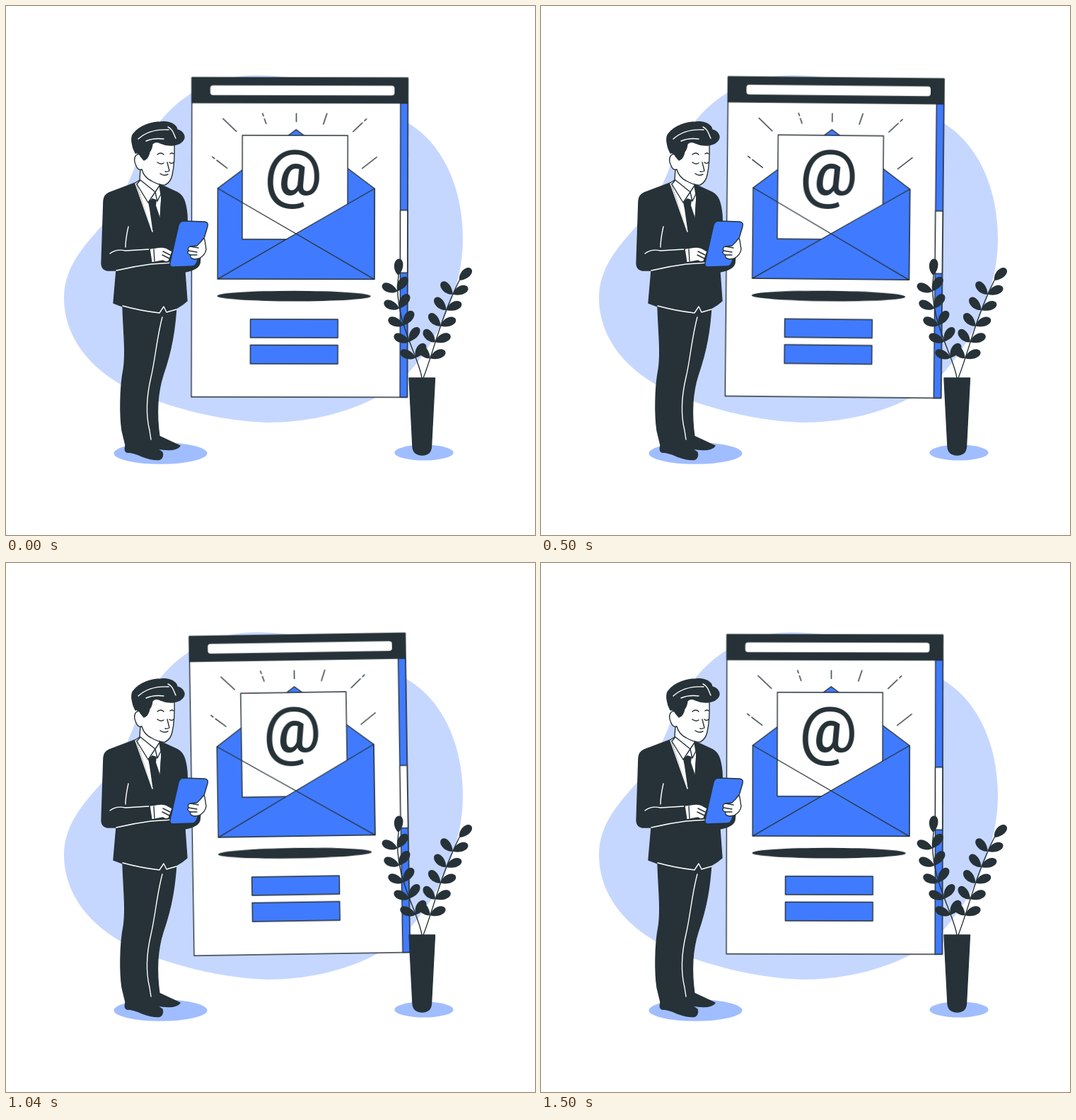
Write an HTML page that moves like this. It is 748 px wide and 748 px high and loops after 1540 ms.

```html
<!DOCTYPE html>
<html lang="en">
<head>
<meta charset="utf-8">
<title>Email campaign</title>
<style>
  html, body { margin: 0; width: 100%; height: 100%; overflow: hidden; background: #fff; }
  svg { display: block; width: 100%; height: 100%; }
  .ink { fill: #263238; }
  .blue { fill: #407bff; }
  .white { fill: #fff; }
  .edge, .chalk { stroke: #263238; stroke-width: 1.4; stroke-linejoin: round; stroke-linecap: round; }
  .chalk { stroke: #fff; }
  .line, .chalk { fill: none; }
  .at { font: 500 91px Roboto, sans-serif; text-anchor: middle; }
  .window { transform-origin: 415px 327px; animation: sway 1540ms linear infinite; }
  @keyframes sway {
    0%, 97.4%, 100% { transform: rotate(.11deg); }
    21.65% { transform: rotate(1deg); }
    70.35% { transform: rotate(-1deg); }
  }
</style>
</head>
<body>
<svg viewBox="0 0 748 748">
  <path fill="#c6d7ff" d="M355 98C435 98 510 128 568 165C620 196 646 260 646 330C646 400 612 472 568 520C536 556 460 589 370 589C300 587 215 565 162 535C110 505 82 460 82 413C82 375 103 347 130 317C158 286 172 255 187 215C210 160 262 98 355 98Z"/>
  <g fill="#a0bdff">
    <ellipse cx="218.5" cy="632.5" rx="66" ry="15.3"/>
    <ellipse cx="591" cy="631.5" rx="41.7" ry="11"/>
  </g>

  <g class="window">
    <rect class="white edge" x="262.5" y="101.5" width="305.3" height="451.5"/>
    <rect class="blue edge" x="557.5" y="137" width="10.3" height="416"/>
    <rect class="white edge" x="557.5" y="288.5" width="10.3" height="88.5"/>
    <rect class="ink edge" x="262.5" y="101.5" width="305.3" height="35.5"/>
    <rect class="white" x="288.5" y="112.5" width="260.5" height="13.7" rx="4"/>

    <path class="line edge" d="M306.500 159.500L325.500 177.500M410.300 152V163.500M453.500 152L448.500 167M524 213.500L503.500 229.500"/>
    <path class="line edge" stroke-dasharray="4 4 20" d="M362.500 152L367.500 166.500M509.500 159.500L490.500 177.500M291.500 213.500L312.500 229.500"/>

    <path class="blue edge" d="M299.300 258L410 174.800L521 258V386H299.300Z"/>
    <rect class="white edge" x="334" y="183" width="149" height="147"/>
    <text class="ink at" x="406.300" y="266.500">@</text>
    <path class="blue edge" d="M299.300 258L410 322L521 258V386.300H299.300L410 322L521 386.300"/>
    <ellipse class="ink" cx="407.300" cy="410.200" rx="108.700" ry="7.400"/>
    <rect class="blue edge" x="345.800" y="443" width="123.700" height="26"/>
    <rect class="blue edge" x="345.800" y="479.500" width="123.700" height="26.500"/>
  </g>

  <g id="plant" class="ink">
    <path class="edge" d="M570 526H606.500L601.500 623Q600.500 635 588.500 635Q576 635 575 623Z"/>
  </g>

  <g id="man">
    <path class="ink edge" d="M170 619Q166 629 171 631Q180 631 193 637Q210 643 218 641Q223 638 221 631L203 618ZM206 609Q206 626 222 627Q241 629 246 622L216 608Z"/>
    <path class="ink edge" d="M165 424C166 460 170 490 166 515C161 540 161 580 164 600L170 625Q190 630 207 625L217 609C213 580 213 550 222 522C235 485 239 455 241 424Z"/>
    <path class="chalk" d="M221 440C213 470 211 500 205 525C198 555 198 580 203 600L205 613"/>

    <path class="white edge" d="M190 230L189 246L183 250L207 320H217L220 270L216 240Z"/>
    <path class="white edge" d="M191 211C183 206 179 216 184 226Q187 233 192 231Q195 242 205 247Q217 254 225 253Q233 249 235 239Q239 222 238 193L205 188Z"/>
    <path class="ink edge" d="M190 212Q188 207 183 208C178 199 176 186 180 181C189 169 207 164 219 164C231 162 241 168 242 175C250 177 254 184 251 189C246 198 230 199 219 194Q211 190 207 195Q206 203 203 206Q201 216 195 218Z"/>
    <path class="chalk" d="M187 188C198 178 214 174 230 175M198 191C207 187 215 187 223 188M229 171C236 174 237 181 240 187"/>
    <path class="line edge" d="M214 210Q219 206 223 210M232 209Q235 207 237 209M214 221Q219 225 223 222M231 221Q234 224 237 221M228 221L231 233Q228 235 225 234M218 237Q223 241 229 238"/>

    <path class="ink edge" d="M183 250L146 264Q139 267 138 275L135 365Q136 373 143 374L156 374L152 420Q180 432 217 436L223 425L227 433Q244 428 256 417L253 376Q271 373 274 364L276 345L257 330L256 295C254 275 250 268 243 264L217 252L220 270L217 321H207Z"/>
    <path class="ink" d="M201 277L207 272L213 274L212 282L218 300V322H208L203 287Z"/>
    <path class="white edge" d="M190 246L185 252L201 278L211 263L214 276L219 266L217 254L211 263Z"/>
    <path class="chalk" d="M173 312Q169 330 169 341M147 350Q156 343 169 346L202 344M156 374Q181 368 205 365L235 363M165 424Q190 431 217 434L223 425L227 433L241 429M183 251L207 319"/>

    <path class="white edge" d="M203 343L211 342Q220 340 226 342L235 347L230 361Q226 363 222 360L206 363Z"/>
    <path class="line edge" d="M209 344L210 361M222 347L232 352M221 352L231 357"/>
    <path class="blue edge" d="M251 304L281 305Q287 306 285 312L270 362Q268 368 263 368L236 369Q231 369 232 363L244 310Q246 304 251 304Z"/>
    <path class="white edge" d="M276 333Q280 326 281 331L283 344Q282 352 273 357L267 358Q259 357 261 352Q255 350 258 346Q256 341 261 340L270 339Z"/>
    <path class="line edge" d="M261 340L272 342M258 346L270 348M261 352L270 352"/>
  </g>
</svg>
<script>
  const plant = document.getElementById("plant");

  function add(d, attrs = {}) {
    const path = document.createElementNS(plant.namespaceURI, "path");
    path.setAttribute("d", d);
    for (const name in attrs) path.setAttribute(name, attrs[name]);
    plant.append(path);
    return path;
  }

  function leaf({ x, y }, angle) {
    add("M0 0C5 -8 19 -10 23 -3C26 5 12 9 0 0Z", { transform: `translate(${x} ${y}) rotate(${angle})` });
  }

  // Five leaf pairs at even spacing, and one leaf at the tip.
  function branch(curve, leftAngle, rightAngle, tipAngle) {
    const stem = add(curve, { class: "line edge" });
    const length = stem.getTotalLength();
    for (let i = 0; i < 5; i++) {
      const joint = stem.getPointAtLength(length * (0.2 + 0.163 * i));
      leaf(joint, leftAngle);
      leaf(joint, rightAngle);
    }
    leaf(stem.getPointAtLength(length), tipAngle);
  }

  branch("M588 526C584 495 546 440 555 381", -155, -54, -85);
  branch("M590 526C606 485 614 442 641 388", -130, -22, -42);
</script>
</body>
</html>
```
